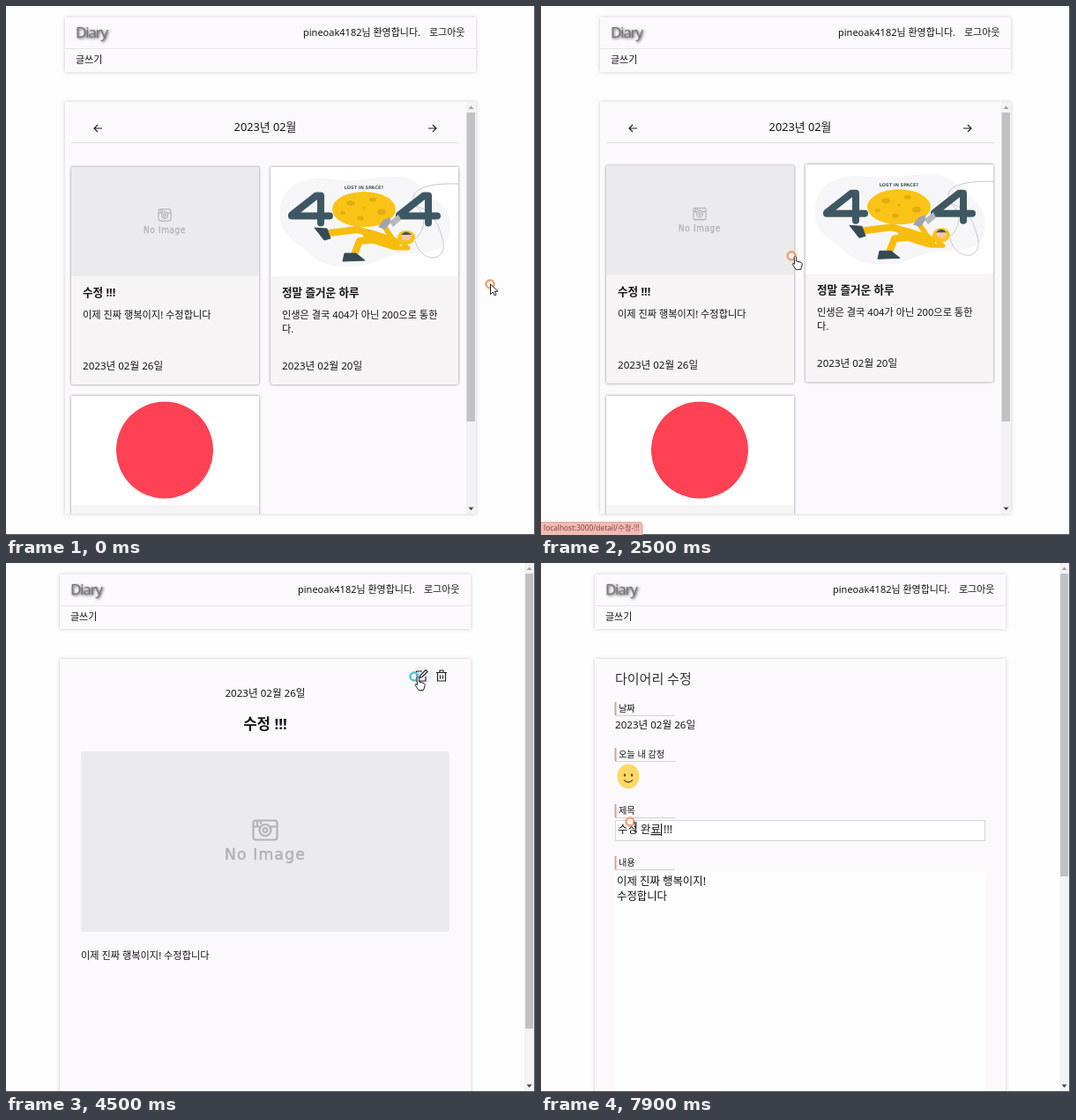
These frames come from a looping animation (600 by 601 pixels, 8 s). An HTML page:

```html
<!DOCTYPE html>
<html lang="ko">
<head>
<meta charset="utf-8">
<title>Diary</title>
<style>
  html, body { margin: 0; width: 100%; height: 100%; overflow: hidden; background: #fefdfe; }
  svg { display: block; width: 100vw; height: 100vh; font: 11.2px "Noto Sans", "Noto Sans CJK KR", sans-serif; fill: #151515; }
  text { white-space: pre; }
  .panel { fill: #fbf9fc; filter: drop-shadow(0 0 2px #0003); }
  .card { filter: drop-shadow(0 0 1.5px #0007); }
  .rule { stroke: #e6e4e8; fill: none; }
  .icon { stroke: #222; fill: none; stroke-width: 1.2; }
  .date { font-size: 11.6px; }
  .bold { font-weight: 600; font-size: 12.6px; }
  .month { font-weight: 500; font-size: 12.8px; }
  .label { font-size: 10.2px; }
  .field { font-size: 12.4px; }
  .track { fill: #f3f2f4; }
  .thumb { fill: #c1c0c2; }
</style>
</head>
<body>
<svg viewBox="0 0 600 601" preserveAspectRatio="none">
  <defs>
    <g id="noImage" fill="#b4b2b5" stroke="#b4b2b5">
      <g fill="none" stroke-width="2.2">
        <rect x="-13.5" y="-11" width="27" height="22" rx="3"/>
        <path d="M-13 -4H-6M6 -4H13M-9 -11V-5M-5 -11V-7"/>
        <circle r="6.5"/><circle r="2.5"/>
      </g>
      <text y="33.5" text-anchor="middle" font-family="DejaVu Sans, sans-serif" font-size="17.2" letter-spacing="1.2" stroke-width=".6">No Image</text>
    </g>
    <g id="cardBase" class="card">
      <rect width="213" height="247" rx="2" fill="#f6f4f5"/>
      <rect width="213" height="124" fill="#fff"/>
    </g>
    <path id="four" d="M38 35V4H33L5 26V27H48" fill="none" stroke="#3e5863" stroke-width="8" stroke-linejoin="round" stroke-linecap="round"/>
    <clipPath id="listClip"><rect x="66" y="108" width="468" height="469"/></clipPath>
    <clipPath id="artClip"><rect width="213" height="124"/></clipPath>
  </defs>
  <rect width="600" height="601" fill="#fefdfe"/>

  <g id="frame">
    <rect class="panel" x="67" y="13" width="466" height="62"/>
    <rect class="panel" id="body" x="67" y="109" width="466" height="468"/>
    <path class="rule" d="M67 48.5H533"/>
    <text x="79" y="35.5" font-size="17" letter-spacing="-1.3" fill="#777" style="text-shadow:1px 1px 3px #444">Diary</text>
    <text x="470" y="34" font-size="11" text-anchor="end">pineoak4182님 환영합니다.</text>
    <text x="480" y="34" font-size="11">로그아웃</text>
    <text x="79" y="65" font-size="11">글쓰기</text>
  </g>

  <g id="list">
    <rect class="track" x="522" y="109" width="11" height="468"/>
    <rect class="thumb" x="522.5" y="121" width="9.5" height="351"/>
    <path d="M524.5 117l3-3.5 3 3.5z" fill="#a3a3a3"/>
    <path d="M524.5 569.5l3 3.5 3-3.5z" fill="#444"/>
    <text class="month" x="294" y="142" text-anchor="middle">2023년 02월</text>
    <path class="icon" d="M109 139H100M104 135L100 139L104 143M479 139H488M484 135L488 139L484 143"/>
    <path class="rule" d="M74 155.5H514"/>
    <g clip-path="url(#listClip)">
      <g id="card1">
        <use href="#cardBase" x="74" y="183"/>
        <rect x="74" y="183" width="213" height="124" fill="#ebeaec"/>
        <use href="#noImage" transform="translate(180 237.5) scale(.52 .6)"/>
        <text class="bold" x="87" y="330">수정 !!!</text>
        <text x="87" y="355">이제 진짜 행복이지! 수정합니다</text>
        <text class="date" x="87" y="413">2023년 02월 26일</text>
      </g>
      <g id="card2">
        <use href="#cardBase" x="300" y="183"/>
        <g transform="translate(300 183)" clip-path="url(#artClip)">
          <path d="M12 40C22 8 62 12 84 15S150 0 168 20 208 42 203 75 150 92 128 104 62 118 46 100 4 80 12 40z" fill="#f6f6f8"/>
          <path d="M162 83C178 72 176 52 164 44C154 24 180 18 213 19M164 84C172 112 205 108 194 78Q188 52 166 44" fill="none" stroke="#c6c8ce"/>
          <text x="106" y="25" font-size="5" text-anchor="middle" font-family="DejaVu Sans, sans-serif" font-weight="700" fill="#3e5863">LOST IN SPACE?</text>
          <use href="#four" x="19" y="28.5"/>
          <use href="#four" x="141" y="28.5"/>
          <ellipse cx="106" cy="48" rx="36" ry="20" fill="#f9c416"/>
          <g fill="#e3ad12">
            <ellipse cx="91" cy="41" rx="5" ry="3"/><ellipse cx="116" cy="37" rx="4" ry="2.5"/>
            <ellipse cx="126" cy="51" rx="5" ry="3.5"/><ellipse cx="102" cy="58" rx="4" ry="2.5"/>
            <ellipse cx="82" cy="52" rx="3" ry="2"/><circle cx="106" cy="46" r="1.5"/>
          </g>
          <g fill="none" stroke="#f7bd0d" stroke-linejoin="round" stroke-linecap="round">
            <path d="M66 75L98 71L122 78" stroke-width="8"/>
            <path d="M122 82L101 84L96 97" stroke-width="8"/>
            <path d="M112 78L140 87" stroke-width="14"/>
            <path d="M140 84L128 66" stroke-width="6"/>
            <path d="M143 92L156 92L146 83" stroke-width="5"/>
          </g>
          <path d="M122 68L128 60L135 57L137 62L130 71z" fill="#a2a4ab"/>
          <path d="M135 62L145 54L148 60L139 68z" fill="#b5b7bd"/>
          <ellipse cx="154" cy="80" rx="10" ry="8" fill="#f9c416"/>
          <ellipse cx="154" cy="79" rx="5.5" ry="4.5" fill="#f4c8a8"/>
          <path d="M148 77q6-7 12 0z" fill="#3e5863"/>
          <path d="M50 69L64 70L68 81L61 83zM84 98L97 98L107 106L82 107z" fill="#344b56" stroke="#344b56" stroke-linejoin="round"/>
        </g>
        <text class="bold" x="313" y="330">정말 즐거운 하루</text>
        <text x="313" y="355">인생은 결국 404가 아닌 200으로 통한</text>
        <text x="313" y="371">다.</text>
        <text class="date" x="313" y="413">2023년 02월 20일</text>
      </g>
      <use href="#cardBase" x="74" y="443"/>
      <circle cx="180" cy="504.5" r="55" fill="#ff4154"/>
    </g>
  </g>

  <g id="detail">
    <circle cx="471" cy="128" r="11" fill="#f1eff4"/>
    <path class="icon" d="M472 123H465.5V134H476V129M469 130.5L470 127.5L476 121.5L478 123.5L472 129.5z"/>
    <path class="icon" d="M488 124.5H500M492 124V122H496V124M489.5 125V134H498.5V125M492.5 127.5V131.5M495.5 127.5V131.5"/>
    <text class="date" x="294" y="152" text-anchor="middle">2023년 02월 26일</text>
    <text x="294" y="189" text-anchor="middle" font-size="16.8" font-weight="600">수정 !!!</text>
    <rect x="85" y="214" width="418" height="205" rx="4" fill="#ebeaec"/>
    <use href="#noImage" x="294" y="303.5"/>
    <text x="85" y="450">이제 진짜 행복이지! 수정합니다</text>
  </g>

  <g id="edit">
    <text x="84" y="137" font-size="15" fill="#333">다이어리 수정</text>
    <g id="labels"></g>
    <text class="date" x="84" y="188">2023년 02월 26일</text>
    <ellipse cx="99" cy="242.5" rx="12.5" ry="14" fill="#fcd966"/>
    <g fill="#6b4a1c"><ellipse cx="95" cy="241" rx="1.2" ry="1.8"/><ellipse cx="103" cy="241" rx="1.2" ry="1.8"/></g>
    <path d="M94 246.5Q99 251.5 104 246.5" fill="none" stroke="#6b4a1c" stroke-width="1.2"/>
    <rect x="84.5" y="292.5" width="419" height="23" fill="#fff" stroke="#d6d4d8"/>
    <text class="field" id="title" x="87" y="307"></text>
    <path id="caret" d="M.5 296V310" stroke="#111"/>
    <rect x="83" y="352" width="421" height="249" fill="#fffeff"/>
    <text class="field" x="86" y="366">이제 진짜 행복이지!</text>
    <text class="field" x="86" y="383">수정합니다</text>
  </g>

  <g id="scroll">
    <rect class="track" x="588" width="11" height="601"/>
    <rect class="thumb" id="thumb" x="589" y="12" width="9" height="517"/>
    <path d="M590.5 8l3-3.5 3 3.5z" fill="#a3a3a3"/>
    <path d="M590.5 592.5l3 3.5 3-3.5z" fill="#444"/>
  </g>
  <path d="M599.5 0V601M0 600.5H600" stroke="#555"/>

  <g id="status">
    <path id="statusBox" fill="#f3bab3" stroke="#dfa59e"/>
    <text id="url" x="3" y="596" font-size="8.3" fill="#7a4a48"></text>
  </g>

  <g id="cursor">
    <circle id="ring" r="4.5" fill="#fff8" stroke-width="2.6"/>
    <path id="arrow" d="M.5 0V11.5L3.3 9L5.200 13L7.1 12L5.3 8.3H9z" fill="#fff" stroke="#222"/>
    <path id="hand" d="M3 1.500Q4.300-.5 5.500 1.500V6L11 7.500Q12.500 8 12 10.500L10.500 15.500H5L1 9.500Q1 7.500 3.500 9.500z" fill="#fff" stroke="#222"/>
    <path id="beam" d="M4 1H8M6 1V11M4 11H8" fill="none" stroke="#222"/>
  </g>
</svg>
<script>
const $ = id => document.getElementById(id);
const show = (id, on) => { $(id).style.display = on ? '' : 'none'; };
const clamp = v => Math.min(1, Math.max(0, v));
const within = (t, a, b) => t >= a && t < b;

// time, x, y of the pointer
const path = [
  [0, 549, 316], [400, 547, 316], [1950, 547, 316], [2800, 179, 271], [3500, 179, 271],
  [4300, 463, 129], [4550, 463, 129], [5000, 241, 184], [5200, 237, 187], [6100, 101, 294], [8000, 101, 294]
];
// time, text before the caret, syllable being composed, text after
const typing = [
  [0, '수정 !!!', '', ''], [6500, '수정', '', ' !!!'], [6800, '수정 ', '', ' !!!'],
  [6900, '수정 ', 'ㅇ', ' !!!'], [7000, '수정 ', '오', ' !!!'], [7100, '수정 ', '와', ' !!!'],
  [7200, '수정 ', '완', ' !!!'], [7400, '수정 완', 'ㄹ', ' !!!'], [7500, '수정 완', '료', ' !!!']
];

$('labels').innerHTML = [['날짜', 158], ['오늘 내 감정', 210], ['제목', 274], ['내용', 333]].map(([name, y]) =>
  `<path class="rule" style="stroke:#d3d1d5" d="M84 ${y + 15.5}H152"/>
   <rect x="83.5" y="${y}" width="2" height="15" fill="#cfa595"/>
   <text class="label" x="88" y="${y + 11}">${name}</text>`).join('');

function pointer(t) {
  const i = path.findIndex(p => p[0] > t), [t0, x0, y0] = path[i - 1], [t1, x1, y1] = path[i];
  const k = (t - t0) / (t1 - t0), e = k * k * (3 - 2 * k);
  return [x0 + (x1 - x0) * e, y0 + (y1 - y0) * e];
}

function lift(id, t, enter, leave) {
  const k = clamp((t - enter) / 200) - clamp((t - leave) / 200);
  $(id).setAttribute('transform', `translate(0 ${-5.4 * k})`);
}

function drawTitle(t) {
  const [since, before, composing, after] = typing.findLast(s => s[0] <= t);
  $('title').innerHTML = `${before}<tspan text-decoration="underline">${composing}</tspan>${after}`;
  const x = 87 + $('title').getSubStringLength(0, before.length + composing.length);
  $('caret').setAttribute('transform', `translate(${Math.round(x)} 0)`);
  show('caret', (t - (since || 4700)) % 1060 < 530);
}

function draw(now) {
  const t = Math.floor(now % 8000 / 100) * 100;
  const page = t < 3400 ? 'list' : t < 4600 ? 'detail' : t < 4700 ? 'loading' : 'edit';
  const wide = page === 'detail' || page === 'edit';
  for (const id of ['list', 'detail', 'edit']) show(id, id === page);
  show('scroll', wide);
  $('frame').setAttribute('transform', `translate(${wide ? -6 : 0} 0)`);
  $('body').setAttribute('height', page === 'list' ? 468 : 500);
  $('thumb').setAttribute('height', page === 'edit' ? 344 : 517);

  const [x, y] = pointer(t);
  const onFirst = page === 'list' && x < 287, onSecond = page === 'list' && within(x, 300, 513);
  lift('card1', t, 2450, 9000);
  lift('card2', t, 2100, 2400);
  show('status', onFirst || onSecond);
  $('url').textContent = 'localhost:3000/detail/' + (onFirst ? '수정-!!!' : '정말-즐거운-하루');
  $('statusBox').setAttribute('d', `M-1 586.5H${onFirst ? 112 : 147}q3 0 3 3V602H-1z`);
  if (page === 'edit') drawTitle(t);

  const onEdit = page === 'detail' && Math.hypot(x - 468, y - 128) < 14;
  const hand = onFirst || onSecond || onEdit;
  const beam = page === 'edit' && y > 290;
  const click = within(t, 3100, 3400) || within(t, 4400, 4700) || within(t, 6500, 6700);
  show('hand', hand);
  show('beam', beam);
  show('arrow', !hand && !beam);
  $('ring').setAttribute('stroke', click ? '#5bbfe8' : '#efa578');
  $('cursor').setAttribute('transform', `translate(${x} ${y})`);
  requestAnimationFrame(draw);
}
requestAnimationFrame(draw);
</script>
</body>
</html>
```
